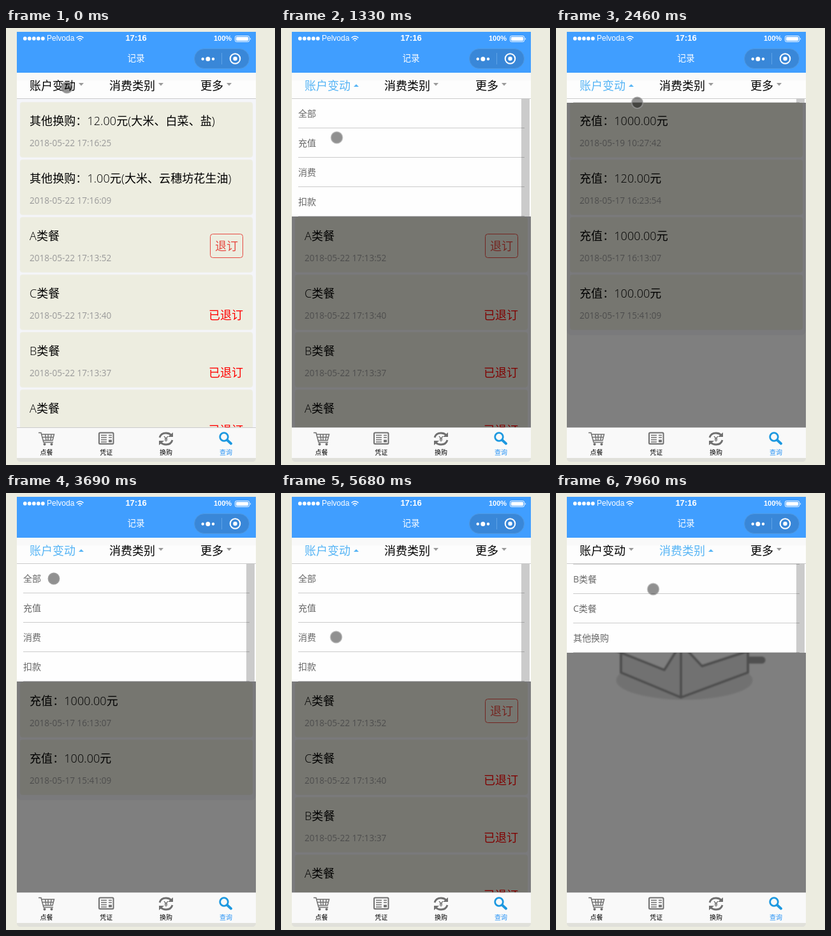
These frames come from a looping animation (422 by 684 pixels, 8000 ms). An HTML page:

```html
<!DOCTYPE html>
<html lang="zh-CN">
<head>
<meta charset="utf-8">
<title>记录</title>
<style>
html, body { margin: 0; width: 100%; height: 100%; overflow: hidden; background: #ecece0; }
svg { display: block; }
text { font-family: "Open Sans", "Noto Sans CJK SC", "Noto Sans CJK", sans-serif; font-size: 18px; font-weight: 350; }
.status text { font-family: "Liberation Sans", "Noto Sans CJK SC", "Noto Sans CJK", sans-serif; font-weight: 400; fill: #fff; }
.status .bold { font-weight: 700; }
.mid { text-anchor: middle; }
.title { letter-spacing: .08px; }
.date { font-size: 13.6px; font-weight: 400; fill: #999; }
.item { font-size: 14px; font-weight: 400; fill: #666; }
.label { font-size: 10px; font-weight: 400; text-anchor: middle; }
.line { stroke: #ccc; fill: none; }

.all, .topup, .empty, .on1, .on2 { animation: 8s step-end infinite; }
.all { animation-name: all; }
.topup { animation-name: topup; }
.empty { animation-name: empty; }
.on1 { animation-name: on1; }
.on2 { animation-name: on2; }
.menu1 { animation: menu1 8s ease-in-out infinite; }
.menu2 { animation: menu2 8s ease-out infinite; }
.cursor { animation: cursor 8s ease-in-out infinite; }

@keyframes all { 0%, 53% { opacity: 1 } 21.25%, 79%, 100% { opacity: 0 } }
@keyframes topup { 0%, 53%, 100% { opacity: 0 } 21.25% { opacity: 1 } }
@keyframes empty { 0% { opacity: 0 } 79%, 100% { opacity: 1 } }
@keyframes on1 {
  0%, 23.75%, 53.75%, 80%, 100% { opacity: 0 }
  3.625%, 29.25%, 62.75% { opacity: 1 }
}
@keyframes on2 { 0% { opacity: 0 } 94.25%, 100% { opacity: 1 } }
@keyframes menu1 {
  0%, 5.25%, 23.75%, 30.5%, 53.75%, 64.25%, 80%, 100% { transform: translateY(-184px) }
  10.25%, 19.5%, 36%, 49.5%, 69.25%, 75.875% { transform: translateY(0) }
  30.75%, 31.5% { transform: translateY(-178px) }
}
@keyframes menu2 {
  0%, 95.5% { transform: translateY(-230px) }
  99.5%, 100% { transform: translateY(-91px) }
}
@keyframes cursor {
  0%, 4.5% { transform: translate(95.5px, 93px) }
  16.625%, 19% { transform: translate(87.5px, 171.5px) }
  25.375%, 29.25% { transform: translate(127.5px, 102px) }
  30.75%, 32% { transform: translate(127.5px, 117px) }
  40.875%, 42.75% { transform: translate(92px, 130px) }
  46.125%, 50% { transform: translate(75px, 134px) }
  59.375%, 62.75% { transform: translate(91.5px, 100px) }
  71%, 75.875% { transform: translate(86.5px, 225.5px) }
  85.625%, 94.25% { transform: translate(197.5px, 97px) }
  99.5%, 100% { transform: translate(152.5px, 150.5px) }
}
</style>
</head>
<body>
<svg width="422" height="684" viewBox="0 0 422 684">
  <defs>
    <clipPath id="page"><path d="M17 111h375v514H17z"/></clipPath>
    <filter id="soft"><feGaussianBlur stdDeviation="1.2"/></filter>
  </defs>
  <path d="M17 665h375v8q0 6-6 6H23q-6 0-6-6z" fill="#e0e0da"/>
  <path d="M17 6h375v667H17z" fill="#fefefe"/>

  <g class="status">
    <path d="M17 6h375v64H17z" fill="#409eff"/>
    <path d="M29.8 16.5h.01m7 0h.01m7 0h.01m7 0h.01m7 0h.01" stroke="#fff" stroke-width="5.8" stroke-linecap="round"/>
    <text x="64" y="20.3" style="font-size:12px">Pelvoda</text>
    <g fill="none" stroke="#fff" stroke-width="1.6">
      <path d="M110.5 15.5q5.5-5 11 0M112.6 17.8q3.4-3 6.8 0"/>
      <path d="M114.3 19h3.4l-1.7 1.8z" fill="#fff" stroke="none"/>
    </g>
    <text class="mid bold" x="204" y="20" style="font-size:13px">17:16</text>
    <text class="bold" x="326" y="20" style="font-size:11px">100%</text>
    <rect x="359.5" y="12.5" width="22" height="9" rx="2" fill="none" stroke="#fff"/>
    <rect x="361" y="14" width="19" height="6" rx="1" fill="#fff"/>
    <path d="M383 15q2 2 0 4z" fill="#fff"/>
    <text class="mid" x="204" y="52" style="font-size:13.5px">记录</text>
    <rect x="295.5" y="32.5" width="86" height="31" rx="15.5" fill="#3987d8" stroke="#4f98e0"/>
    <path d="M338.5 39v18" stroke="#5fa3e6"/>
    <g fill="#fff">
      <circle cx="308.7" cy="48.5" r="2.2"/><circle cx="316.8" cy="48.5" r="3.5"/><circle cx="325" cy="48.5" r="2.2"/>
      <circle cx="359.5" cy="48" r="3.2"/>
    </g>
    <circle cx="359.5" cy="48" r="7.8" fill="none" stroke="#fff" stroke-width="2"/>
  </g>

  <g clip-path="url(#page)">
    <g class="all" id="all"></g>
    <g class="topup" id="topup"></g>
    <g class="empty">
      <path d="M17 111h375v514H17z" fill="#fefefe"/>
      <g filter="url(#soft)" stroke-linejoin="round">
        <ellipse cx="201.5" cy="293" rx="107" ry="30.500" fill="#e3e3e3"/>
        <path d="M64 227.500h36M96 202.500h34M310 238.500h33M300 261.500h23" stroke="#a0a0a0" stroke-width="11" stroke-linecap="round"/>
        <g stroke="#9c9c9c" stroke-width="4" fill="#fefefe">
          <path d="M102 236v45l94 39v-85zM301 236v45l-105 39v-85z" fill="#e3e3e3"/>
          <path d="M107 205.500L203 181l99 24.500-106 30z"/>
          <path d="M203 181v52"/>
          <path d="M107 205.500l89 30-26 41.500-93-37zM302 205.500l28 32.500-101 33-33-35.500z"/>
        </g>
        <g fill="none" stroke="#c4c4c4" stroke-linecap="round">
          <path d="M113 186q68 1 128-37" stroke-width="3.400"/>
          <path d="M161 206q60-2 106-36" stroke-width="2.600"/>
        </g>
      </g>
    </g>
    <path class="on1" d="M17 111h375v514H17z" fill-opacity=".5"/>
    <path class="on2" d="M17 111h375v514H17z" fill-opacity=".5"/>
    <g class="menu1" id="menu1"></g>
    <g class="menu2" id="menu2"></g>
  </g>

  <path d="M17 70h375v40H17z" fill="#fdfdfd"/>
  <path d="M17 70h375v12H17z" fill="#f9f9f9"/>
  <g id="tabs"></g>
  <path class="line" d="M17 110.500h375"/>

  <path d="M17 625h375v48H17z" fill="#f9f9f9"/>
  <path class="line" d="M17 625.500h375"/>
  <g fill="none" stroke="#707070" stroke-width="1.500">
    <path d="M51 633.500h4l4 15h15M56 636h19.500l-2.500 9.500H58.500M57 640.500h17.500M61.500 636l1.500 9.500M66 636v9.500M71 636l-1 9.500"/>
    <path d="M60.500 651.500h.01M71.500 651.500h.01" stroke-width="4" stroke-linecap="round"/>
    <rect x="146" y="633.500" width="22.500" height="17.500" rx="1.500" stroke-width="2"/>
    <path d="M149 637.500h9M149 641h9M149 644.500h9M161 637.500h5M161 641h5M149 648h9"/>
    <path d="M161 646.500h5" stroke-width="4"/>
    <path d="M241 641q2-7 10-7 5 0 8 3M261 645q-2 7-10 7-5 0-8-3" stroke-width="2.800"/>
    <path d="M262 633v7h-8zM240 653v-7h8z" fill="#707070" stroke="none"/>
    <path d="M248 639l3 3.500 3-3.500M251 642.500v5M248.500 643h5M248.500 645h5" stroke-width="1.200"/>
    <circle cx="342" cy="640" r="6.300" stroke="#1c98e0" stroke-width="2.800"/>
    <path d="M347 645l6 5.500" stroke="#1c98e0" stroke-width="4" stroke-linecap="round"/>
  </g>
  <g id="nav"></g>

  <circle class="cursor" r="8.700" fill="#000" fill-opacity=".43" stroke="#999" stroke-width="1.500" stroke-opacity=".9"/>
</svg>
<script>
const put = (id, html) => { document.getElementById(id).innerHTML = html; };
const text = (x, y, s, cls = "", fill = "") =>
  `<text x="${x}" y="${y}" class="${cls}"${fill && ` fill="${fill}"`}>${s}</text>`;

const refund = y =>
  `<rect x="320.5" y="${y + 6.5}" width="51" height="37" rx="4" fill="none" stroke="#e64a42"/>` +
  text(346, y + 32, "退订", "mid", "#e64a42");
const refunded = y => text(318, y + 70, "已退订", "", "#f00");

const card = ([title, date, extra], i) => {
  const y = 116 + 90 * i;
  return `<rect x="22" y="${y}" width="365" height="86.5" rx="4" fill="#edede0" stroke="#eeeeea" stroke-width=".6"/>` +
    text(37, y + 36, title, "title") + text(37, y + 69, date, "date") + (extra ? extra(y) : "");
};
const list = (bottom, rows) =>
  `<path d="M17 111h375v514H17z" fill="#fefefe"/>` +
  `<rect x="17" y="100" width="375" height="${bottom - 100}" rx="8" fill="#f4f5f9"/>` +
  rows.map(card).join("");

put("all", list(660, [
  ["其他换购：12.00元(大米、白菜、盐)", "2018-05-22 17:16:25"],
  ["其他换购：1.00元(大米、云穗坊花生油)", "2018-05-22 17:16:09"],
  ["A类餐", "2018-05-22 17:13:52", y => refund(y + 20)],
  ["C类餐", "2018-05-22 17:13:40", refunded],
  ["B类餐", "2018-05-22 17:13:37", refunded],
  ["A类餐", "2018-05-22 17:13:31", refunded]
]));
put("topup", list(481, [
  ["充值：1000.00元", "2018-05-19 10:27:42"],
  ["充值：120.00元", "2018-05-17 16:23:54"],
  ["充值：1000.00元", "2018-05-17 16:13:07"],
  ["充值：100.00元", "2018-05-17 15:41:09"]
]));

const menu = items => {
  const h = 46 * items.length;
  return `<path d="M17 111h375v${h}H17z" fill="#fefefe"/><path d="M377 111h13v${h}h-13z" fill="#cbcbcb"/>` +
    items.map((s, i) => text(27, 139 + 46 * i, s, "item") +
      `<path d="M27 ${156.5 + 46 * i}h355" stroke="#000" stroke-opacity=".2"/>`).join("");
};
put("menu1", menu(["全部", "充值", "消费", "扣款"]));
put("menu2", menu(["全部", "A类餐", "B类餐", "C类餐", "其他换购"]));

const caret = (x, up) => up
  ? `<path d="M${x} 92l4-4 4 4z" fill="#55b4f5"/>`
  : `<path d="M${x} 86h8l-4 4.5z" fill="#999"/>`;
const tab = (s, x, cx, on) => text(x, 97, s) + caret(cx) + (on
  ? `<g class="${on}"><path d="M${x - 4} 82h94v26h-94z" fill="#fdfdfd"/><path d="M${x - 4} 76h94v6h-94z" fill="#f9f9f9"/>` +
    `${text(x, 97, s, "", "#55b4f5")}${caret(cx, true)}</g>`
  : "");
put("tabs", tab("账户变动", 37, 114, "on1") + tab("消费类别", 162, 239, "on2") + tab("更多", 305, 346));

put("nav", ["点餐", "凭证", "换购", "查询"].map((s, i) =>
  text(63.5 + 93.8 * i, 667.5, s, "label", i == 3 ? "#1f8ff5" : "#000")).join(""));
</script>
</body>
</html>
```
